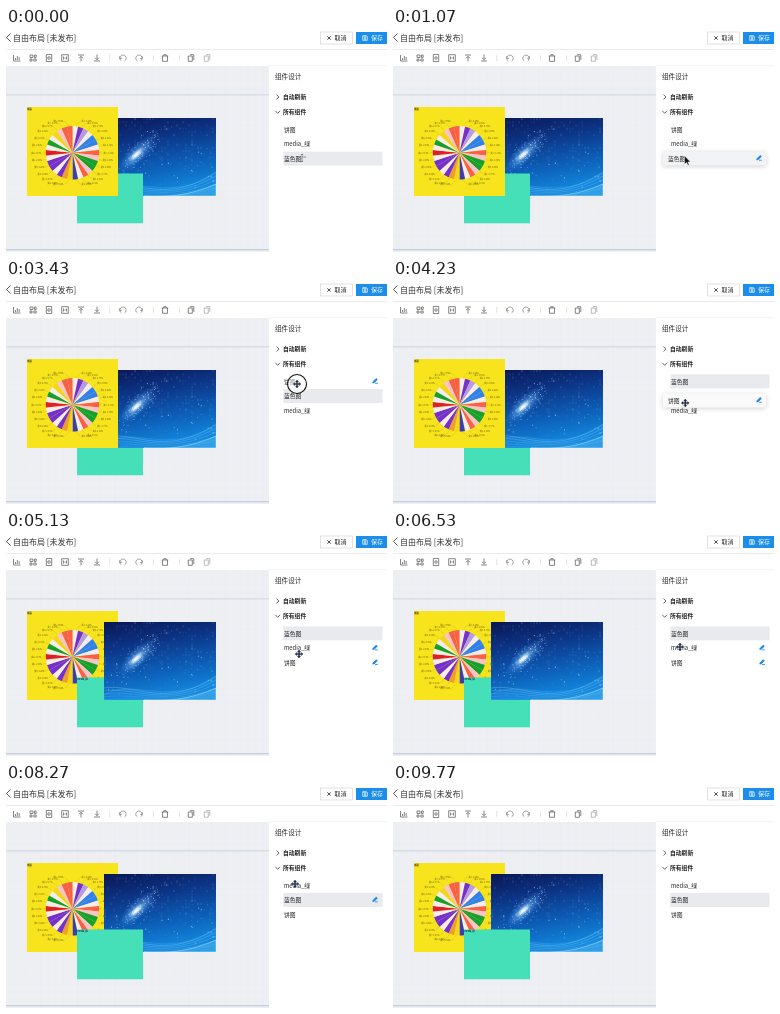
An HTML page with a canvas for the animation above (9810 ms loop, 381 by 224 pixels).

```html
<!DOCTYPE html>
<html lang="zh-CN">
<head>
<meta charset="utf-8">
<title>自由布局</title>
<style>
html, body { margin: 0; height: 100%; overflow: hidden; background: #fff; }
canvas { display: block; width: 381px; height: 224px; }
</style>
</head>
<body>
<canvas></canvas>
<script>
const LOOP = 9810;
const canvas = document.querySelector('canvas');
const g = canvas.getContext('2d');
const dpr = window.devicePixelRatio || 1;
canvas.width = 381 * dpr;
canvas.height = 224 * dpr;

const FONT = '"Noto Sans CJK SC", "Noto Sans CJK", "Noto Sans", sans-serif';
const INK = '#222', BLUE = '#1585ea';
const rnd = i => { const v = Math.sin(i * 12.9898 + 4.1) * 43758.5453; return v - Math.floor(v); };
const clamp = v => Math.max(0, Math.min(1, v));
const ease = v => { v = clamp(v); return v * v * (3 - 2 * v); };

function box(x, y, w, h, fill) {
  g.fillStyle = fill;
  g.fillRect(x, y, w, h);
}
function text(s, x, y, size, color = INK, weight = 400, align = 'left') {
  g.font = `${weight} ${size}px ${FONT}`;
  g.textAlign = align;
  g.fillStyle = color;
  g.fillText(s, x, y + size * 0.38);
}
function path(d, x, y, color = '#666', width = 0.8, fill) {
  const p = new Path2D(d);
  g.save();
  g.translate(x, y);
  g.lineWidth = width;
  g.strokeStyle = color;
  if (fill) { g.fillStyle = fill; g.fill(p); }
  g.stroke(p);
  g.restore();
}

// Latest value in a list of [time, value]
const at = (steps, t) => steps.filter(s => s[0] <= t).pop()[1];

const TOOLS = [
  [11, 'M-3.5-3V3H3.5M-1.5 2V0M.3 2V-2M2.2 2V-1'],
  [27, 'M-3-3H0V-.5H-3ZM1.5-3H3.2V-.5H1.5ZM-3 1H-1V3H-3ZM.8 1H3.2V3H.8Z'],
  [43, 'M-2.7-3.5H2.7V3.5H-2.7ZM-1.3 0A1.3 1.3 0 1 0 1.3 0A1.3 1.3 0 1 0-1.3 0'],
  [59, 'M-3.3-3.3H3.3V3.3H-3.3ZM-1.5-1.5V1.5M1.5-1.5V1.5M-.6 0H.6'],
  [75, 'M-3-3H3M0 3.5V-1.5M-2 .3L0-1.7L2 .3'],
  [91, 'M-3 3H3M0-3.5V1.5M-2-.3L0 1.7L2-.3'],
  [117, 'M-1.6 3A3.2 3.2 0 1 1 1.6 3M-3.3-1.8V.4H-1.2', '#888'],
  [133, 'M1.6 3A3.2 3.2 0 1 0-1.6 3M3.3-1.8V.4H1.2', '#888'],
  [159, 'M-3.3-2H3.3M-1.2-2V-3.3H1.2V-2M-2.5-2V3.3H2.5V-2'],
  [185, 'M-2.7-2H1.3V3.3H-2.7ZM-1-3.3H2.8V2'],
  [201, 'M-2.7-2H1.3V3.3H-2.7ZM-1-3.3H2.8V2', '#aaa']
];

function chrome() {
  box(0, 0, 381, 224, '#fff');
  path('M4-4L0 0L4 4', 0.5, 9.5, '#444', 0.9);
  text('自由布局 [未发布]', 7, 9.7, 8, '#333');
  g.lineWidth = 0.7;
  g.strokeStyle = '#d4d4d4';
  g.strokeRect(314.5, 4, 32, 12);
  path('M-1.7-1.7L1.7 1.7M1.7-1.7L-1.7 1.7', 323, 10, INK, 0.8);
  text('取消', 328.5, 10, 6);
  box(350, 4, 31, 12, '#1b8deb');
  path('M-2.3-2.3H1.4L2.3-1.4V2.3H-2.3ZM-1-2.3V-.8H1V-2.3M-.8 1A.8.8 0 1 0 .8 1A.8.8 0 1 0-.8 1', 359, 10, '#fff', 0.7);
  text('保存', 365, 10, 6, '#fff');
  box(0, 21, 381, 0.8, '#e6e6e6');
  for (const [x, d, color] of TOOLS) path(d, x, 30, color);
  for (const x of [103.5, 147, 173]) box(x, 27, 0.7, 6, '#d8d8d8');

  box(0, 38, 263, 186, '#edeff3');
  for (let x = 5; x < 263; x += 7.4) box(x, 38, 0.5, 186, '#eaecf1');
  for (let y = 45; y < 224; y += 7.4) box(0, y, 263, 0.5, '#eaecf1');
  box(0, 66.5, 263, 0.8, '#c6cfdf');
  box(0, 221.3, 263, 0.9, '#b4c0d6');
  box(263, 37.5, 118, 186.5, '#fff');
  box(263, 37.5, 118, 0.6, '#ececec');

  text('组件设计', 269, 48.8, 6.6);
  path('M-1.2-2.4L1.3 0L-1.2 2.4', 271.7, 69, '#444');
  text('自动刷新', 277, 69, 5.8, INK, 700);
  path('M-2.4-1.2L0 1.3L2.4-1.2', 271.7, 84, '#444');
  text('所有组件', 277, 83.7, 5.8, INK, 700);
}

const TINTS = {
  r: '#f8604a', w: '#f6ecee', p: '#7430d0', l: '#b49ae8', g: '#16a030',
  b: '#2f80f0', k: '#f8c4cc', y: '#f5d51c', o: '#ef9d2c', d: '#e01f2a', n: '#3b3fae'
};
const SLICES = 'wplwbbwrkggkrwnyopwppwdwgwykrr';

function pie() {
  box(21, 79, 91, 89, '#f8e41c');
  text('饼图', 21.3, 81, 2.2, '#222', 700);
  const cx = 66.5, cy = 124.8, step = 2 * Math.PI / SLICES.length;
  [...SLICES].forEach((c, i) => {
    const a = -Math.PI / 2 + i * step;
    g.beginPath();
    g.moveTo(cx, cy);
    g.arc(cx, cy, 26.7, a, a + step);
    g.closePath();
    g.fillStyle = TINTS[c];
    g.fill();
  });
  for (let i = 0; i < 26; i++) {
    const a = (i + 0.5) * Math.PI / 13 - Math.PI / 2;
    const c = Math.cos(a), s = Math.sin(a), side = Math.sign(c);
    const x = cx + side * 6 + 25 * c, y = cy + 32 * s;
    text(`类${i % 9 + 1}: ${(2 + rnd(i)).toFixed(2)}%`, x, y, 2.1, 'rgba(50,45,10,.75)', 400, c > 0 ? 'left' : 'right');
    path(`M${-side} 0L${27 * c - 6 * side - 25 * c} ${-5 * s}`, x, y, 'rgba(110,95,20,.5)', 0.25);
  }
}

function sky() {
  g.save();
  g.translate(98, 90);
  g.beginPath();
  g.rect(0, 0, 112, 78);
  g.clip();
  const bg = g.createLinearGradient(0, 0, 14, 78);
  [[0, '#0a1654'], [0.35, '#0c3485'], [0.7, '#0c5bb4'], [1, '#1180d6']].forEach(s => bg.addColorStop(...s));
  box(0, 0, 112, 78, bg);

  for (let i = 0; i < 170; i++) {
    const x = Math.floor(rnd(i) * 38) * 3, y = Math.floor(rnd(i + 300) * 15) * 3.2;
    box(x, y, 2, 2.2, `rgba(120,175,240,${0.03 + rnd(i + 600) * 0.12})`);
  }

  g.save();
  g.translate(34, 35);
  g.rotate(-0.76);
  g.scale(1, 0.36);
  const glow = g.createRadialGradient(-3, 0, 0, 0, 0, 25);
  [[0, '#fff'], [0.16, 'rgba(225,242,255,.9)'], [0.4, 'rgba(105,180,245,.5)'], [1, 'rgba(50,130,230,0)']]
    .forEach(s => glow.addColorStop(...s));
  box(-28, -28, 56, 56, glow);
  for (let i = 0; i < 120; i++) {
    const x = (rnd(i) + rnd(i + 50) + rnd(i + 99) - 1.4) * 38;
    const y = (rnd(i + 200) + rnd(i + 250) - 1) * 30;
    box(x, y, 0.8, 2, `rgba(235,247,255,${0.3 + rnd(i + 400) * 0.6})`);
  }
  g.restore();

  path('M0 72C35 56 62 86 112 55V78H0Z', 0, 0, 'rgba(120,205,255,.4)', 0.5, 'rgba(30,150,235,.28)');
  for (let i = 0; i < 5; i++) {
    path(`M0 ${66 + i * 3}C30 ${61 + i * 3} 62 ${88 - i} 112 ${54 + i * 4}`, 0, 0,
      `rgba(180,230,255,${0.5 - i * 0.07})`, 0.5);
  }
  path('M40 78C65 80 90 76 112 66V78Z', 0, 0, 'rgba(215,245,255,.7)', 0.6, 'rgba(90,195,245,.4)');
  for (let i = 0; i < 60; i++) {
    g.beginPath();
    g.arc(rnd(i + 20) * 112, 30 + rnd(i + 80) * 44, 0.25 + rnd(i + 140) * 0.5, 0, 7);
    g.fillStyle = `rgba(205,240,255,${0.2 + rnd(i) * 0.5})`;
    g.fill();
  }
  g.restore();
}

function media() {
  box(71, 145.5, 66, 49.8, '#46e0b8');
  text('media_绿', 71.5, 147.3, 2.2, '#123', 700);
}

const rowY = r => 101.5 + r * 14.6;
const ITEMS = {
  pie: { label: '饼图', paint: pie, rows: [[0, 0], [4800, 2]] },
  media: { label: 'media_绿', paint: media, rows: [[0, 1], [1500, 2], [4350, 1], [7900, 0]] },
  sky: { label: '蓝色图', paint: sky, rows: [[0, 2], [2450, 1], [4000, 0], [7350, 1]] }
};
const DRAGS = [['sky', 1000, 2450], ['pie', 3700, 4800], ['media', 7000, 7900]];
const LAYERS = [
  [0, ['sky', 'media', 'pie']], [2500, ['media', 'sky', 'pie']],
  [4850, ['pie', 'media', 'sky']], [7950, ['pie', 'sky', 'media']]
];
const EDITS = [
  [0, []], [700, ['sky']], [1500, ['sky', 'media']], [2500, ['sky']], [2900, ['pie']],
  [4800, ['media', 'pie']], [7350, ['media']], [7950, ['sky']], [8900, []]
];
const TRACK = [
  [0, 296, 130], [400, 296, 130], [900, 292, 132], [1000, 292, 132], [1900, 292, 117.5],
  [2500, 292, 117.5], [3100, 291, 104], [3700, 291, 104], [4600, 293, 134], [4800, 293, 134],
  [5100, 293, 122], [5700, 293, 122], [6300, 287, 115], [7000, 287, 115], [7700, 289, 100],
  [8700, 289, 100], [9350, 392, 92], [LOOP, 392, 92]
];

function pointer(t) {
  const i = TRACK.findIndex(k => k[0] > t);
  const [t0, x0, y0] = TRACK[i - 1], [t1, x1, y1] = TRACK[i];
  const k = ease((t - t0) / (t1 - t0));
  return [x0 + (x1 - x0) * k, y0 + (y1 - y0) * k];
}

// Rows glide to a new slot; a dragged row follows the pointer and settles on release
function restY(name, t) {
  const { rows } = ITEMS[name];
  const [, grab, drop] = DRAGS.find(d => d[0] === name);
  let y = rowY(rows[0][1]);
  for (const [start, slot] of rows.slice(1)) {
    const from = start === drop ? dragY(name, grab, drop) : y;
    if (t >= start) y = from + (rowY(slot) - from) * ease((t - start) / 180);
  }
  return y;
}
function dragY(name, grab, t) {
  return rowY(at(ITEMS[name].rows, grab)) + pointer(t)[1] - pointer(grab)[1];
}

function row(name, t, drag) {
  const held = drag && drag[0] === name;
  const x = held ? 275 : 278;
  const y = held ? dragY(name, drag[1], t) : restY(name, t);
  if (held) {
    g.save();
    g.shadowColor = 'rgba(0,0,0,.18)';
    g.shadowBlur = 5 * dpr;
    g.shadowOffsetY = dpr;
    box(x - 5, y - 7, 103, 14, name === 'sky' ? '#f2f3f5' : '#fafafa');
    g.restore();
  } else if (name === 'sky') {
    box(277.3, y - 7.1, 99.2, 14, '#e8eaee');
  }
  text(ITEMS[name].label, x, y, 5.8);
  if (at(EDITS, t).includes(name)) {
    path('M-2 1.3L1.2-2L2.3-.9L-.9 2.2L-2.2 2.4ZM0 2.8H2.8', x + 91, y - 1, BLUE, 0.8, BLUE);
  }
}

function cursor(t) {
  const [x, y] = pointer(t);
  if (t < 800) {
    path('M0-3.5V3.5M-1.2-3.5H1.2M-1.2 3.5H1.2M0-1H4', x, y, '#555', 0.6);
  } else if (t < 2600) {
    path('M0-4V4.5L2 2.8L3.4 5.6L4.7 5L3.4 2.2H6Z', x - 0.5, y, '#fff', 0.5, '#111');
  } else {
    if ((t > 3300 && t < 3650) || (t > 6750 && t < 7000)) {
      g.beginPath();
      g.arc(x, y, 9.5, 0, 7);
      g.fillStyle = 'rgba(255,255,255,.5)';
      g.fill();
      g.strokeStyle = '#111';
      g.lineWidth = 1.1;
      g.stroke();
    }
    const cross = 'M0-4L1.6-2.3H.6V-.6H2.3V-1.6L4 0L2.3 1.6V.6H.6V2.3H1.6L0 4L-1.6 2.3H-.6V.6H-2.3V1.6L-4 0L-2.3-1.6V-.6H-.6V-2.3H-1.6Z';
    path(cross, x, y, '#fff', 1.1);
    path(cross, x, y, '#14213d', 0.3, '#14213d');
  }
}

function draw(now) {
  const t = now % LOOP;
  g.setTransform(dpr, 0, 0, dpr, 0, 0);
  chrome();
  at(LAYERS, t).forEach(name => ITEMS[name].paint());
  const drag = DRAGS.find(d => t >= d[1] && t < d[2]);
  const names = ['sky', 'media', 'pie'];
  if (drag) names.push(...names.splice(names.indexOf(drag[0]), 1));
  names.forEach(name => row(name, t, drag));
  cursor(t);
}

const start = performance.now();
function frame() {
  draw(performance.now() - start);
  requestAnimationFrame(frame);
}
frame();
</script>
</body>
</html>
```
